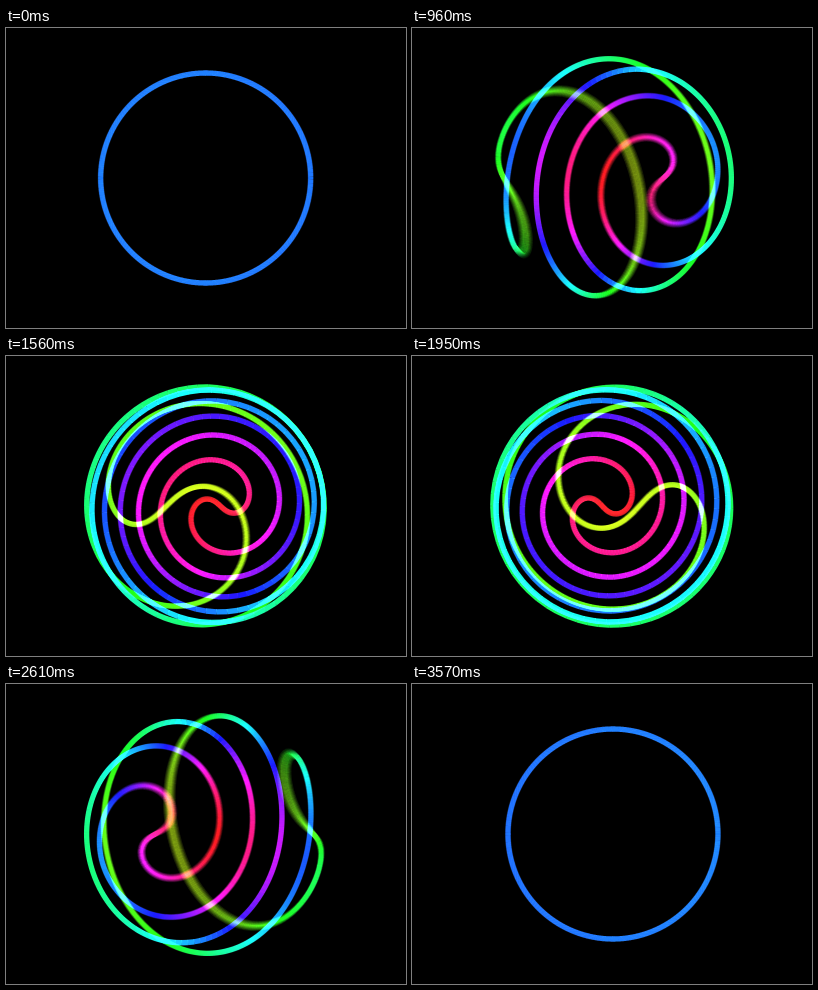
An HTML page with a canvas for the animation above (3.6 s loop, 400 px wide and 300 px high).

```html
<!DOCTYPE html>
<html lang="en">
<head>
<meta charset="utf-8">
<title>Twisting ring</title>
<style>
  html, body { margin: 0; width: 100%; height: 100%; overflow: hidden; background: #000; }
  canvas { display: block; }
</style>
</head>
<body>
<canvas id="stage" width="400" height="300"></canvas>
<script>
const ctx = document.getElementById('stage').getContext('2d');
const LOOP = 3600, STEP = 30;
const RADIUS = 105, CAMERA = 2.1;       // camera distance in sphere radii
const MAX_TWIST = 11.85;                // radians at the poles
const SEGMENTS = 720, SAMPLES = 8, SHUTTER = 0.6;

const ease = u => u < 0.5 ? 4 * u ** 3 : 1 - 4 * (1 - u) ** 3;

// A great circle twisted about its own axis, while the axis swings from left to right.
function ringPoint(phi, theta, twist) {
  const along = Math.cos(phi), out = Math.sin(phi);
  const up = out * Math.cos(twist * along);
  const side = out * Math.sin(twist * along);
  const c = Math.cos(theta), s = Math.sin(theta);
  const z = along * s - side * c;
  const scale = RADIUS * CAMERA / (CAMERA - z);
  return { x: 200 - (along * c + side * s) * scale, y: 150 - up * scale, z };
}

function drawRing(p) {
  const theta = Math.PI * p;
  const twist = MAX_TWIST * ease(1 - Math.abs(2 * p - 1));
  let a = ringPoint(0, theta, twist);
  for (let i = 1; i <= SEGMENTS; i++) {
    const b = ringPoint(2 * Math.PI * i / SEGMENTS, theta, twist);
    ctx.strokeStyle = `hsl(${216 - 72 * (a.z + b.z)}, 100%, 55%)`;
    ctx.beginPath();
    ctx.moveTo(a.x, a.y);
    ctx.lineTo(b.x, b.y);
    ctx.stroke();
    a = b;
  }
}

function draw(step) {
  ctx.globalCompositeOperation = 'source-over';
  ctx.globalAlpha = 1;
  ctx.fillStyle = '#000';
  ctx.fillRect(0, 0, 400, 300);
  // Motion blur: add up several moments of the open shutter.
  ctx.globalCompositeOperation = 'lighter';
  ctx.globalAlpha = 1 / SAMPLES;
  ctx.lineWidth = 5.3;
  for (let i = 0; i < SAMPLES; i++) {
    drawRing((step + SHUTTER * i / SAMPLES) * STEP / LOOP);
  }
}

const start = performance.now();
let shown = -1;
function tick() {
  const step = Math.floor((performance.now() - start) % LOOP / STEP);
  if (step !== shown) draw(shown = step);
  requestAnimationFrame(tick);
}
tick();
</script>
</body>
</html>
```
